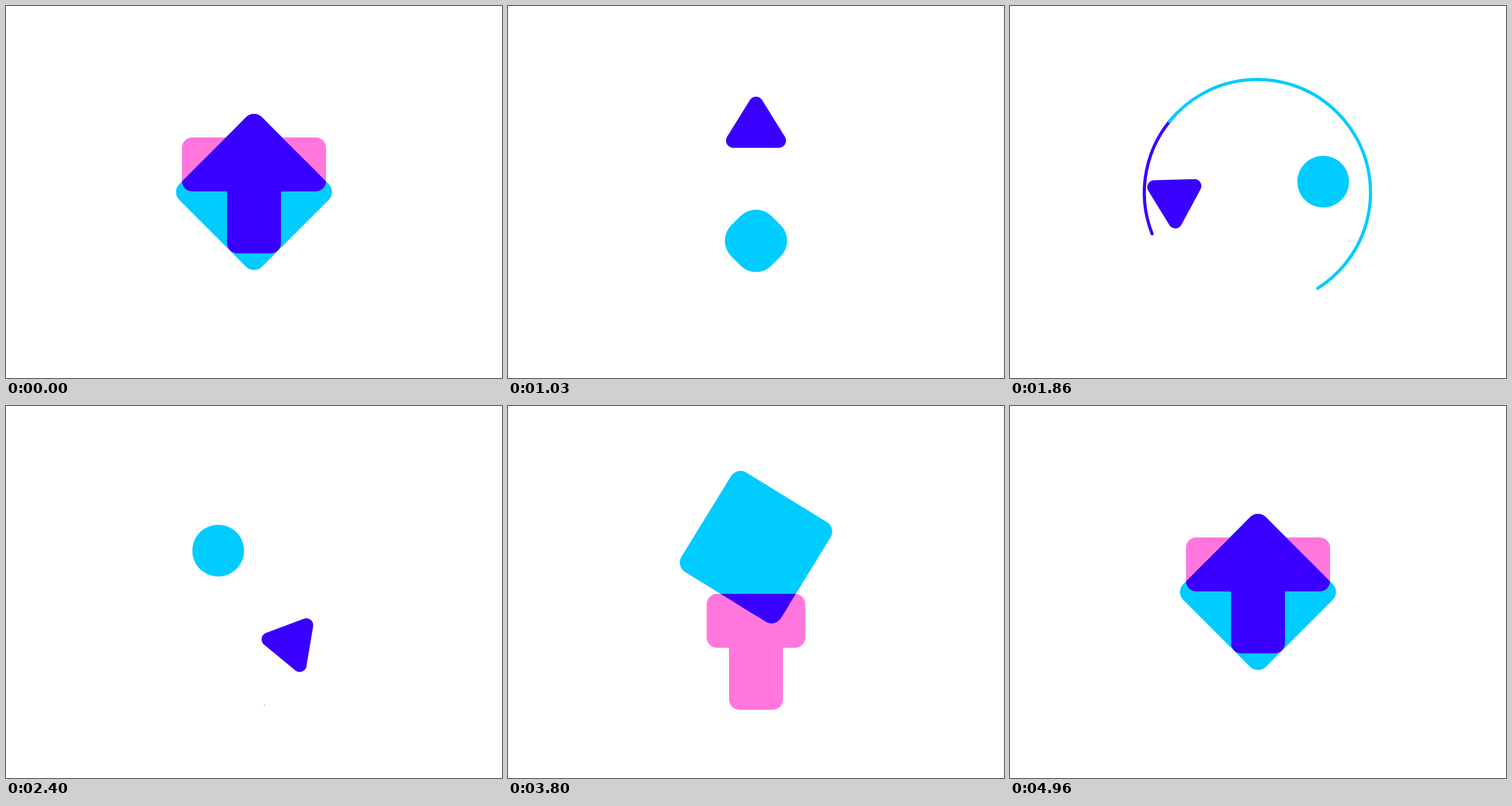
Animation of 864x648 px, one loop 5.83 s. Source, as an HTML page with a canvas:

```html
<!DOCTYPE html>
<html lang="en">
<head>
<meta charset="utf-8">
<title>Shape loop</title>
<style>
  html, body { margin: 0; height: 100%; overflow: hidden; background: #fff; }
  canvas { display: block; }
</style>
</head>
<body>
<canvas id="stage" width="864" height="648"></canvas>
<script>
const ctx = document.getElementById('stage').getContext('2d');
const LOOP = 5830, STEP = 100 / 3, CX = 432, CY = 324, RAD = Math.PI / 180;
const CYAN = '#00ccff', BLUE = '#3a00ff', PINK = '#ff77dd';

// Main beats: arrow launch, both shapes in place, spin, crash, slam, rest
const LAUNCH = 780, PLACED = 1333, SPIN = 1386, CRASH = 3130, SLAM = 3740, REST = 4940;

const mix = (a, b, u) => a + (b - a) * u;
const smooth = s => s * s * (3 - 2 * s);
const linear = s => s;
const easeIn = p => s => s ** p;
const easeOut = p => s => 1 - (1 - s) ** p;
const ramp = (t, from, to, ease = smooth) =>
  ease(Math.max(0, Math.min(1, (t - from) / (to - from))));

const shrink = t => ramp(t, LAUNCH, 1080);
const spin = (t, angle, power) => angle * ramp(t, SPIN, 3270, easeIn(power));
const swing = t => 60 * ramp(t, 1060, PLACED);

function spring(t) {
  const s = Math.max(0, t - SLAM);
  return Math.exp(-.004 * s) * Math.cos(Math.PI * s / 390);
}

function orbit(degrees, r) {
  const a = degrees * RAD;
  return [CX + r * Math.sin(a), CY - r * Math.cos(a)];
}

// Arrow head, triangle and T share one moving point.
function headPos(t) {
  const angle = Math.min(893, swing(t) + spin(t, 840, 1.03)) + 7 * ramp(t, 3267, 3400);
  const r = 46 - 58 * ramp(t, 100, LAUNCH)
    + 174 * ramp(t, LAUNCH, PLACED, easeOut(2))
    - 117 * ramp(t, 1400, CRASH, easeIn(1.5))
    + 48 * ramp(t, CRASH, 3330, easeOut(3));
  return t < CRASH ? orbit(angle, r) : orbit(angle, (r + 48) * spring(t) - 48);
}
const headTurn = t => spin(t, 780, 1.08);

function gemPos(t) {
  const r = 120.4 * ramp(t, LAUNCH, PLACED, easeOut(2))
    - 75 * ramp(t, 1400, CRASH, easeIn(2))
    + 67 * ramp(t, CRASH, 3480, easeOut(3));
  return orbit(swing(t) + spin(t, 840, 1.047), -r * spring(t));
}

function box(x, y, w, h, r) {
  const p = new Path2D();
  p.roundRect(x, y, w, h, Math.max(0, Math.min(r, w / 2, h / 2)));
  return p;
}

// Polygon grown by a round border of radius r
function blob(points, r, color) {
  ctx.beginPath();
  points.forEach(([x, y]) => ctx.lineTo(x, y));
  ctx.closePath();
  ctx.fillStyle = ctx.strokeStyle = color;
  ctx.lineWidth = 2 * r;
  ctx.lineJoin = 'round';
  ctx.fill();
  ctx.stroke();
}

function clipped(path, draw) {
  ctx.save();
  ctx.clip(path);
  draw();
  ctx.restore();
}

// Diamond when open is 1, circle when open is 0
function gemPath(t) {
  const open = 1 - shrink(t) + ramp(t, CRASH, 3680);
  const half = mix(45, 101.8, open) + 14.6 * ramp(t, 100, 680) * (1 - shrink(t));
  const turn = t < SPIN ? 45 : 90 * ramp(t, CRASH, 4420, easeOut(2.6)) - 45;
  const p = new Path2D();
  p.addPath(box(-half, -half, 2 * half, 2 * half, mix(45, 19.5, Math.sqrt(open))),
    new DOMMatrix().translate(...gemPos(t)).rotate(turn));
  return p;
}

const stemLength = t => 153.2 + 9.6 * ramp(t, 100, 680);

function drawArrow(t) {
  const [x, y] = headPos(t), u = shrink(t), len = stemLength(t);
  const w = mix(105, 35.2, u), h = mix(106.5, 61, u);
  const tri = () => {
    ctx.translate(x, y);
    ctx.rotate(headTurn(t) * RAD);
    blob([[0, -2 * h / 3], [w, h / 3], [-w, h / 3]], mix(19.5, 12, u), BLUE);
  };
  const area = new Path2D();
  if (t < LAUNCH) area.addPath(box(306.5, y + len - 358, 251, 250, 18));
  else area.rect(0, 0, 864, 648);
  clipped(area, tri);
  if (u < 1) {
    const sw = 94 * (1 - u);
    ctx.fillStyle = BLUE;
    ctx.fill(box(x - sw / 2, y, sw, len * (1 - u), 18));
  }
}

// Triangle that unfolds into a T; lift raises the top edge of the bar.
function drawTee(t, color, lift = 0) {
  const m = ramp(t, 3290, 3480), w = mix(35.2, 107.5, ramp(t, 3290, 4420, linear));
  const low = mix(0, w, m), bottom = mix(40.7, 29, m), top = mix(-20.3, -29, m) - lift;
  ctx.save();
  ctx.translate(...headPos(t));
  ctx.rotate((headTurn(t) - 780) * RAD);
  blob([[-w, top], [w, top], [low, bottom], [-low, bottom]], mix(12, 18, m), color);
  if (m > 0) {
    const sw = mix(10, 47, m);
    ctx.fill(box(-sw, 0, 2 * sw, mix(20, 155, m), 18));
  }
  ctx.restore();
}

function teeColor(t) {
  const u = ramp(t, 3205, 3355, linear);
  return `rgb(${mix(58, 255, u)}, ${mix(0, 119, u)}, ${mix(255, 221, u)})`;
}

function strokeLine(color, width, trace) {
  ctx.beginPath();
  trace();
  ctx.strokeStyle = color;
  ctx.lineWidth = 5.5 * Math.min(1, width);
  ctx.lineCap = 'round';
  ctx.stroke();
}

// Arc drawn once around, its tail running after its head
function swoosh(color, from, head, tail) {
  if (head <= tail) return;
  strokeLine(color, (1 - tail) * 30 + .25, () =>
    ctx.arc(431, 325, 197, (from + 360 * tail) * RAD, (from + 360 * head) * RAD));
}

function spark(color, x1, y1, x2, y2, head, tail) {
  if (head <= tail) return;
  strokeLine(color, (1 - tail) * 4, () => {
    ctx.moveTo(mix(x1, x2, tail), mix(y1, y2, tail));
    ctx.lineTo(mix(x1, x2, head), mix(y1, y2, head));
  });
}

function drawLines(t) {
  swoosh(BLUE, -95.5, ramp(t, 1365, 2000), ramp(t, 1450, 2100));
  swoosh(CYAN, 84.5, ramp(t, 1350, 1970), ramp(t, 1480, 2412));

  // Crash: four rays, fading clockwise from the lower left
  for (let i = 0; i < 4; i++) {
    const sx = i < 2 ? -1 : 1, sy = i % 3 ? -1 : 1, off = 3155 + 36 * i;
    spark(sy < 0 ? BLUE : CYAN, 431 + 105 * sx, 319.5 + 59.5 * sy, 431 + 128 * sx, 319.5 + 75.5 * sy,
      ramp(t, 3120, 3200, linear), ramp(t, off, off + 135, linear));
  }
  // Slam: one ray on each side
  for (const sx of [-1, 1]) {
    const on = 4145 - 25 * sx;
    spark(BLUE, CX + 115 * sx, 287, CX + 148 * sx, 318,
      ramp(t, on, on + 140, linear), ramp(t, 4200, 4300, linear));
  }
}

function render(t) {
  ctx.fillStyle = '#fff';
  ctx.fillRect(0, 0, 864, 648);
  drawLines(t);
  if (t < 600) {
    const bottom = headPos(t)[1] + stemLength(t) - 108;
    ctx.fillStyle = PINK;
    ctx.fill(box(306.5, bottom - 94, 251, 94, 18));
  }
  const gem = gemPath(t);
  ctx.fillStyle = CYAN;
  ctx.fill(gem);
  if (t < 3200) {
    drawArrow(t);
  } else {
    drawTee(t, teeColor(t));
    clipped(gem, () => drawTee(t, BLUE, 60 * ramp(t, 3900, 4080)));
  }
}

const start = performance.now();
function tick() {
  const t = (performance.now() - start) % LOOP;
  const resting = t < 130 || t > REST;
  render(resting ? LOOP : Math.floor((t + 6.7) / STEP) * STEP);
  requestAnimationFrame(tick);
}
tick();
</script>
</body>
</html>
```
